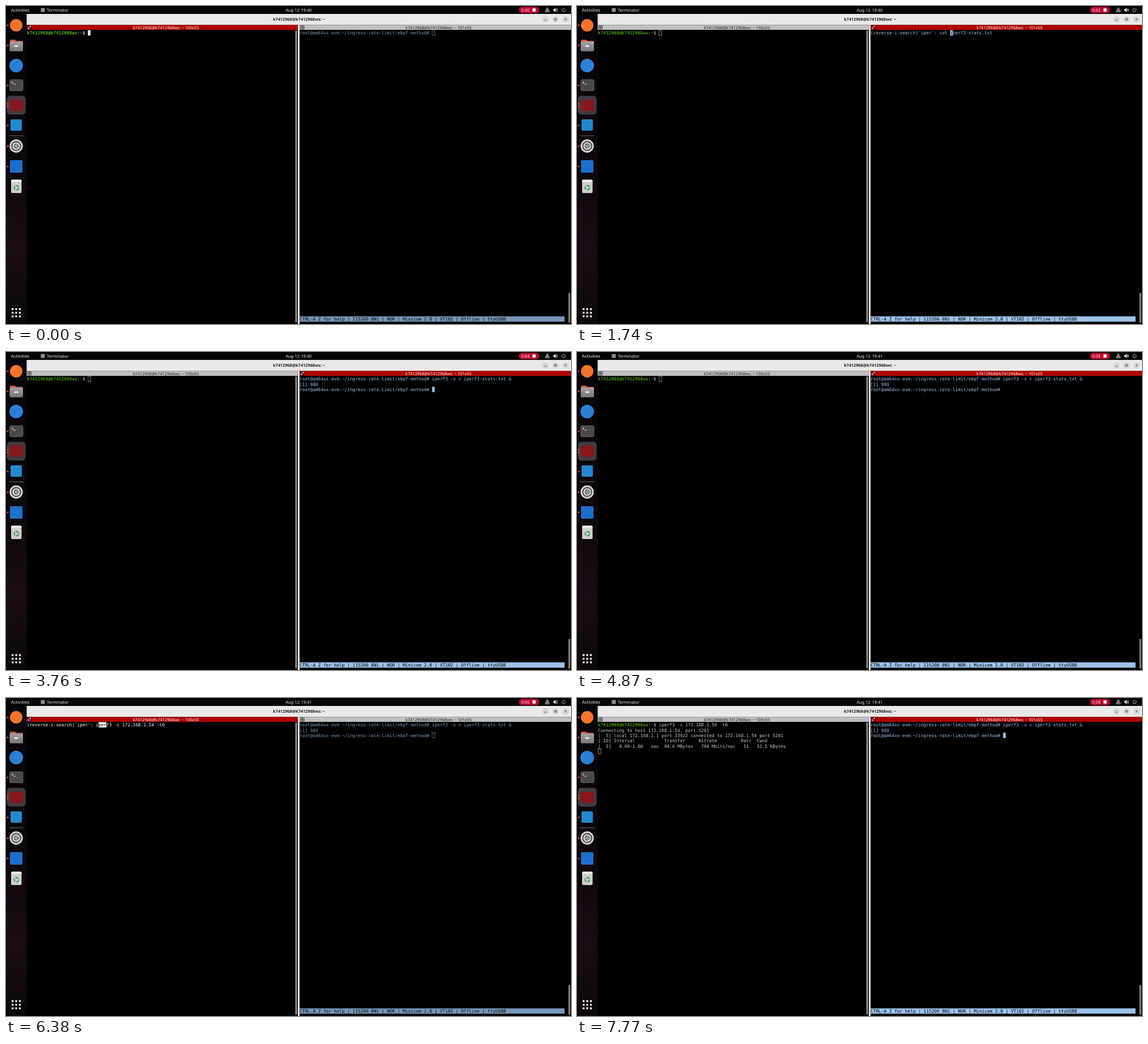
Recreate the animation shown at these times as an HTML page. Size 998 px wide and 561 px high, loop 8000 ms.

```html
<!DOCTYPE html>
<html lang="en">
<head>
<meta charset="utf-8">
<title>Terminal session</title>
<style>
html, body { margin: 0; width: 100%; height: 100%; overflow: hidden; background: #000; }
svg { display: block; width: 100vw; height: 100vh; }
text { white-space: pre; text-rendering: geometricPrecision; }
.ui { font: 500 7.4px "Noto Sans", "Open Sans", sans-serif; fill: #e8e8e8; }
.mid { text-anchor: middle; }
.term { font: 7.774px "DejaVu Sans Mono", monospace; }
.pane { --fg: #ccc; --user: #439a08; --dir: #4a6a98; }
.pane.on { --fg: #fff; --user: #55bb12; --dir: #6088c0; }
#right { --fg: #7797b8; }
#right.on { --fg: #9cc3ea; }
.pane .fg { fill: var(--fg); }
.pane .user { fill: var(--user); font-weight: bold; }
.pane .dir { fill: var(--dir); font-weight: bold; }
.pane .inv { fill: #000; }
.head { fill: #c0bfbf; }
.on .head { fill: #b00000; }
.pane .ui { font-size: 7.3px; font-weight: 400; fill: #222; }
.pane.on .ui { fill: #fff; }
.grid { fill: none; stroke: #333; stroke-width: .9; }
.on .grid { stroke: #301010; }
.spark { display: none; }
.on .spark { display: inline; }
.hollow { fill: none; stroke: var(--fg); stroke-width: .6; }
</style>
</head>
<body>
<svg viewBox="0 0 998 561" preserveAspectRatio="none">
  <defs>
    <linearGradient id="dockFill" x2="0" y2="1">
      <stop offset="0" stop-color="#07050b"/>
      <stop offset=".55" stop-color="#10080e"/>
      <stop offset=".76" stop-color="#180d14"/>
      <stop offset="1" stop-color="#0c070a"/>
    </linearGradient>
    <linearGradient id="folderFill" x2="0" y2="1">
      <stop offset="0" stop-color="#a5a2a2"/>
      <stop offset="1" stop-color="#777476"/>
    </linearGradient>
  </defs>
  <rect width="998" height="561"/>

  <g id="dock">
    <rect y="14" width="36.5" height="547" fill="url(#dockFill)"/>
    <rect x="1.5" y="158.5" width="33" height="33" rx="6" fill="#3f3d42"/>
    <circle cx="18" cy="34" r="11" fill="#f4742c"/>
    <path d="M7 61.500q0-2 2-2h7l2 2h10q2 0 2 2v6h-23z" fill="#d8664a"/>
    <rect x="6.500" y="63" width="23.500" height="17" rx="2" fill="url(#folderFill)"/>
    <rect x="14.500" y="69.500" width="7" height="2.500" rx="1" fill="#f2f2f2"/>
    <circle cx="18" cy="105" r="12" fill="#2b80d6"/>
    <rect x="6.500" y="130" width="23.500" height="19.500" rx="2.500" fill="#4b4a48" stroke="#6b6a68" stroke-width=".8"/>
    <path d="M10 133.500l2.500 1.700-2.500 1.700M13.500 138h3.500" fill="none" stroke="#eee"/>
    <rect x="7" y="165" width="23" height="20" rx="2" fill="#87171a"/>
    <rect x="8" y="200" width="20" height="20" rx="2" fill="#2389cf"/>
    <path d="M5.500 229h25.500" stroke="#8c878a" stroke-width=".8"/>
    <circle cx="18" cy="247" r="11.700" fill="#d9d8d5"/>
    <circle cx="18" cy="247" r="7.500" fill="none" stroke="#555" stroke-width="1.800"/>
    <circle cx="18" cy="247" r="8.600" fill="none" stroke="#555" stroke-width="1.500" stroke-dasharray="1.500 1.500"/>
    <circle cx="18" cy="247" r="3.500" fill="none" stroke="#555" stroke-width="1.600"/>
    <path d="M18 247h4.500M18 247l-2.500 4M18 247l-2.500-4" stroke="#555"/>
    <rect x="7" y="272" width="22" height="22" rx="2" fill="#1c70cc"/>
    <rect x="9" y="306.500" width="18.500" height="23.500" rx="2.500" fill="#cfcfca"/>
    <rect x="9" y="306.500" width="18.500" height="4" rx="1.500" fill="#eeeeea"/>
    <circle cx="18.200" cy="320.500" r="3.800" fill="none" stroke="#2e9a50" stroke-width="2" stroke-dasharray="6 1.960"/>
  </g>

  <g id="topbar">
    <rect width="998" height="14" fill="#050507"/>
    <text class="ui" x="9" y="9.700" style="font-size:7.700px">Activities</text>
    <rect x="61.500" y="3.500" width="7" height="7" rx="1" fill="#8d8d8d"/>
    <text class="ui" x="72" y="9.700">Terminator</text>
    <text class="ui" x="494" y="9.700">Aug 12</text>
    <text class="ui" x="540" y="9.700" text-anchor="end" id="clock"></text>
    <rect x="906" y="1.500" width="35.500" height="11" rx="5.500" fill="#c00a30"/>
    <text class="ui" x="910" y="9.700" id="timer"></text>
    <rect x="930" y="4.300" width="5.500" height="5.500" rx=".6" fill="#fff"/>
    <g fill="none" stroke="#ddd" stroke-width=".8">
      <path d="M954.800 3.500h2.800v2.500h-2.800zM952.800 8h2.500v2.500h-2.500zM957 8h2.500v2.500h-2.500zM956.200 6v1.200M954 8v-1h4.300v1"/>
      <path d="M967 5.700h1.600l2-2v6.600l-2-2h-1.600z" fill="#ddd"/>
      <path d="M972 5q1.300 2 0 4M973.200 4q2 3 0 6"/>
      <path d="M983 4.700a3 3 0 1 0 3.600 0M984.800 3.200v3.300"/>
    </g>
  </g>

  <g id="titlebar">
    <rect x="36.500" y="14" width="961.500" height="19.500" fill="#e9e9e8"/>
    <text class="ui mid account" x="517.500" y="26.200" style="font-weight:600;font-size:7.300px;fill:#222"></text>
    <g fill="#d6d5d4">
      <circle cx="953" cy="23.500" r="5.600"/><circle cx="970.700" cy="23.500" r="5.600"/><circle cx="988.500" cy="23.500" r="5.600"/>
    </g>
    <path d="M951.200 25h3.600M969.200 22h3v3h-3zM987 22l3 3M990 22l-3 3" fill="none" stroke="#333" stroke-width=".8"/>
  </g>

  <g id="left" class="pane"></g>
  <g id="right" class="pane"></g>
  <rect x="511" y="43" width="3" height="515.500" rx="1.500" fill="#8b8985"/>
  <rect x="515.500" y="33.500" width="3" height="527.500" fill="#efeeec"/>
  <rect x="993.500" y="506" width="3" height="53" rx="1.500" fill="#8b8985"/>
</svg>

<script>
const LOOP = 8000, CELL_W = 4.68, CELL_H = 9.35, TOP = 42.6;
const USER = 'k7412968', ACCOUNT = `${USER}@${USER}ws`;
const $ = id => document.getElementById(id);
const SVG = 'http://www.w3.org/2000/svg';

function add(parent, tag, attrs, text) {
  const node = document.createElementNS(SVG, tag);
  for (const key in attrs) node.setAttribute(key, attrs[key]);
  if (text !== undefined) node.textContent = text;
  return parent.appendChild(node);
}

// Dock: running-app dots and the 3 x 3 app launcher.
for (const cy of [34, 69.5, 140, 172.5, 177.5, 210.5, 247.5, 283])
  add($('dock'), 'circle', { cx: 3, cy, r: 1.5, fill: '#e2482c' });
for (let i = 0; i < 9; i++)
  add($('dock'), 'rect', { x: 10 + i % 3 * 6.4, y: 533 + Math.floor(i / 3) * 6.4,
    width: 3.4, height: 3.4, rx: .9, fill: '#f0f0f0' });

// Screens: rows are lists of [text, class]; cursor is [column, row].
const plain = text => [[text, 'fg']];
const localPrompt = cmd => [[ACCOUNT, 'user'], [':', 'fg'], ['~', 'dir'], ['$ ' + cmd, 'fg']];
const boardPrompt = cmd => plain('root@am64xx-evm:~/ingress-rate-limit/ebpf-method# ' + cmd);
const screen = (rows, cursor, mark = 0) => ({ rows, cursor, mark });

function search(typed, cmd = '', offset = 0, marked = false) {
  const label = `(reverse-i-search)\`${typed}': `;
  return screen([plain(label + cmd)], [label.length + offset, 0], marked ? typed.length : 0);
}

const CLIENT = 'iperf3 -c 172.168.1.54 -t0';
const SERVER = 'iperf3 -s > iperf3-stats.txt &';
const STATS = 'cat iperf3-stats.txt';
const report = [
  localPrompt(CLIENT),
  plain('Connecting to host 172.168.1.54, port 5201'),
  plain('[  5] local 172.168.1.1 port 33922 connected to 172.168.1.54 port 5201'),
  plain('[ ID] Interval           Transfer     Bitrate         Retr  Cwnd'),
  plain('[  5]   0.00-1.00   sec  94.6 MBytes   794 Mbits/sec   51   32.5 KBytes')
];

const typing = (times, cmd, offset, marked) =>
  times.map((time, i) => [time, search('iper'.slice(0, i + 1), cmd, offset, marked)]);

const leftScript = [
  [0, screen([localPrompt('')], [23, 0])],
  [5600, search('')],
  ...typing([5920, 6060, 6200, 6340], CLIENT, 0, true),
  [6420, screen(report.slice(0, 2), [0, 2])],
  [6440, screen(report.slice(0, 3), [0, 3])],
  [7440, screen(report, [0, 5])]
];
const rightScript = [
  [0, screen([boardPrompt('')], [50, 0])],
  [1260, search('')],
  ...typing([1400, 1500, 1600, 1700], STATS, 4),
  [2380, search('iper', SERVER)],
  [2800, screen([boardPrompt(SERVER), plain('[1] 980'), boardPrompt('')], [50, 2])]
];

const latest = (script, t) => script.findLast(([time]) => time <= t)[1];
const within = (t, spans) => spans.some(([from, to]) => t >= from && t < to);
const leftFocus = t => t < 1000 || within(t, [[5040, 7140]]);
const blinkedOff = t => within(t, [[100, 700], [3080, 3700], [4280, 4880]]);

function makePane(id, x, headX, headW, size) {
  const pane = $(id);
  add(pane, 'rect', { class: 'head', x: headX, y: 33.5, width: headW, height: 8.6 });
  add(pane, 'path', { class: 'grid', d: `M${headX + 2} 34.800h6v6h-6zM${headX + 5} 34.800v6M${headX + 2} 37.800h6` });
  const spark = add(pane, 'g', { class: 'spark' });
  add(spark, 'rect', { x: headX + 2, y: 37.5, width: 3, height: 3, fill: '#6bb4ff' });
  add(spark, 'rect', { x: headX + 5.5, y: 35, width: 2, height: 2, fill: '#eee' });
  add(pane, 'text', { class: 'ui mid', x: x + 245.5, y: 40.6 }, `${ACCOUNT}: ~ ${size}`);
  if (id === 'right') {
    const y = TOP + 54 * CELL_H;
    add(pane, 'rect', { class: 'fg', x, y, width: 100 * CELL_W, height: CELL_H });
    add(pane, 'text', { class: 'term inv', x, y: y + 7.6 },
      'CTRL-A Z for help | 115200 8N1 | NOR | Minicom 2.8 | VT102 | Offline | ttyUSB8');
  }
  const body = add(pane, 'g', { class: 'term' });
  let shown, shownKey;

  const block = (col, row, cols, cls) => add(body, 'rect',
    { class: cls, x: x + col * CELL_W, y: TOP + row * CELL_H, width: cols * CELL_W, height: CELL_H });

  function glyphs(row, col, parts) {
    const line = add(body, 'text', { x: x + col * CELL_W, y: TOP + row * CELL_H + 7.6 });
    for (const [text, cls] of parts) add(line, 'tspan', { class: cls }, text);
  }

  return (view, focused, off) => {
    const key = `${focused}${off}`;
    if (view === shown && key === shownKey) return;
    shown = view;
    shownKey = key;
    pane.classList.toggle('on', focused);
    body.replaceChildren();
    view.rows.forEach((parts, row) => glyphs(row, 0, parts));
    const [col, row] = view.cursor;
    const text = (view.rows[row] || []).map(part => part[0]).join('');
    const invert = (from, cols) => {
      block(from, row, cols, 'fg');
      glyphs(row, from, [[text.slice(from, from + cols), 'inv']]);
    };
    // The cursor cell inside a marked match flips back to normal video.
    if (view.mark > 1) invert(col + 1, view.mark - 1);
    if (view.mark) return;
    if (!focused) {
      add(body, 'rect', { class: 'hollow', x: x + col * CELL_W + .3, y: TOP + row * CELL_H + .3,
        width: CELL_W + .2, height: CELL_H - .4 });
    } else if (!off) invert(col, 1);
  };
}

const drawLeft = makePane('left', 37, 36.5, 479, '100x55');
const drawRight = makePane('right', 518.6, 518.5, 479.5, '101x55');
document.querySelector('.account').textContent = `${ACCOUNT}: ~`;

function setText(node, value) {
  if (node.textContent !== value) node.textContent = value;
}

const start = performance.now();
function tick(now) {
  const t = Math.max(0, now - start) % LOOP;
  const focus = leftFocus(t), off = blinkedOff(t);
  setText($('clock'), t < 4290 ? '19:40' : '19:41');
  setText($('timer'), `0:0${Math.floor((t + 260) / 1000)}`);
  drawLeft(latest(leftScript, t), focus, off);
  drawRight(latest(rightScript, t), !focus, off);
  requestAnimationFrame(tick);
}
tick(start);
</script>
</body>
</html>
```
